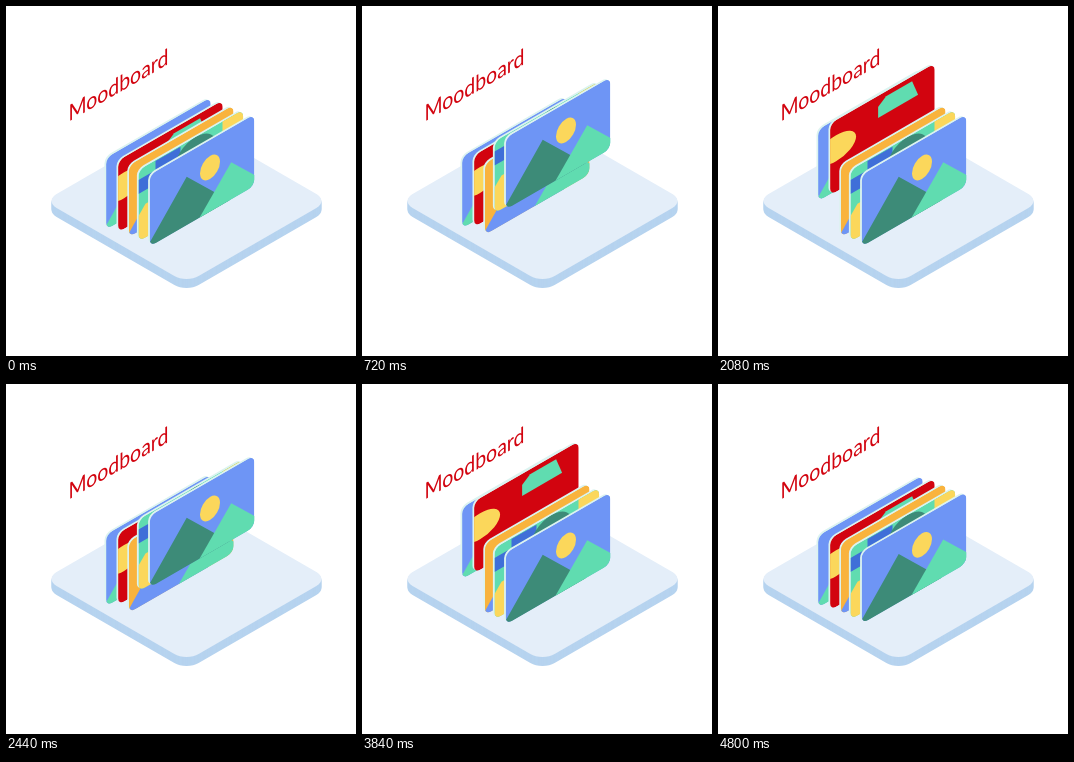
An HTML page with a canvas that plays this animation: 350 px wide and 350 px high, repeating every 4.84 s.

```html
<!DOCTYPE html>
<html lang="en">
<head>
<meta charset="utf-8">
<title>Moodboard</title>
<style>
html, body { margin: 0; width: 100%; height: 100%; overflow: hidden; background: #fff; }
canvas { display: block; width: 350px; height: 350px; }
</style>
</head>
<body>
<canvas id="stage"></canvas>
<script>
const canvas = document.getElementById('stage');
const ctx = canvas.getContext('2d');
const scale = window.devicePixelRatio || 1;
canvas.width = canvas.height = 350 * scale;

const LOOP = 4840, STEP = 40;
const WAVES = [120, 1840, 3600];
const STAGGER = 120, RISE = 120, FALL = 680, LIFT = 37;
const SHEAR = -0.577;
const CARD = { w: 104.6, h: 71.7, r: 6.5 };
const C = {
  blue: '#6e95f5', deep: '#3f6fd8', yellow: '#fbd75b', dark: '#3d8b78', green: '#60dcb0',
  red: '#d2040f', orange: '#f9b33d', rim: '#dcf3f0',
  top: '#e4eef9', side: '#b6d3ef', text: '#d2040f'
};

function place(a, b, c, d, x, y) {
  ctx.setTransform(a * scale, b * scale, c * scale, d * scale, x * scale, y * scale);
}

function poly(color, ...points) {
  ctx.beginPath();
  points.forEach(([x, y]) => ctx.lineTo(x, y));
  ctx.fillStyle = color;
  ctx.fill();
}

function oval(color, x, y, rx, ry) {
  ctx.beginPath();
  ctx.ellipse(x, y, rx, ry, 0, 0, Math.PI * 2);
  ctx.fillStyle = color;
  ctx.fill();
}

function rect(color, x, y, w, h) {
  ctx.fillStyle = color;
  ctx.fillRect(x, y, w, h);
}

function landscape(sky, near, far, sun) {
  return (x, y) => {
    rect(sky, 0, 0, CARD.w, CARD.h);
    oval(sun, 60.3, 27.6, 10, 11.5);
    place(1, 0, 0, 1, x, y);
    poly(near, [37, 2], [110, 42.5], [110, 90], [-12.4, 90]);
    poly(far, [81.5, -12.5], [110, 3], [110, 90], [23, 90]);
  };
}

function collage() {
  rect(C.red, 0, 0, CARD.w, CARD.h);
  oval(C.yellow, 6, 28, 20, 13);
  poly(C.green, [48, 11], [56, 5], [82, 5], [88, 22], [48, 22]);
}

function abstract() {
  rect(C.green, 0, 0, CARD.w, CARD.h);
  rect(C.deep, 17, 1, 25, 10);
  rect(C.deep, 0, 10, 42, 14);
  oval(C.dark, 57, 22, 22, 22);
  rect(C.yellow, 84, 0, 22, CARD.h);
  poly(C.yellow, [0, 46], [7, 38], [76, 38], [76, 80], [0, 80]);
}

const cards = [
  { x: 100.1, y: 151.7, paint: landscape(C.blue, C.green, C.dark, C.yellow) },
  { x: 112.1, y: 154.6, paint: collage },
  { x: 122.9, y: 159.3, paint: landscape(C.orange, C.blue, C.green, C.yellow) },
  { x: 132.5, y: 163.9, paint: abstract },
  { x: 143.7, y: 168.7, paint: landscape(C.blue, C.dark, C.green, C.yellow) }
];

// Fraction of the lift while falling: one drop, then three shrinking bounces.
function dropHeight(u) {
  if (u < 1 / 2.75) return 1 - 7.5625 * u * u;
  const bounces = [[1.5, 0.25], [2.25, 0.0625], [2.625, 0.015625]];
  const [mid, peak] = bounces[u < 2 / 2.75 ? 0 : u < 2.5 / 2.75 ? 1 : 2];
  return 0.57 * Math.max(0, peak - 7.5625 * (u - mid / 2.75) ** 2);
}

function lift(t) {
  if (t <= 0 || t >= RISE + FALL) return 0;
  if (t < RISE) return LIFT * Math.sin(t / RISE * Math.PI / 2);
  return LIFT * dropHeight((t - RISE) / FALL);
}

function cardPath(x, y) {
  place(1, SHEAR, 0, 1, x, y);
  ctx.beginPath();
  ctx.roundRect(0, 0, CARD.w, CARD.h, CARD.r);
}

function drawCard(paint, x, y) {
  ctx.fillStyle = C.rim;
  cardPath(x - 1.6, y - 0.9);
  ctx.fill();
  ctx.save();
  cardPath(x, y);
  ctx.clip();
  paint(x, y);
  ctx.restore();
}

function drawPlatform() {
  for (let depth = 9; depth >= 0; depth--) {
    place(0.866, 0.5, -0.866, 0.5, 180.5, 195 + depth);
    ctx.beginPath();
    ctx.roundRect(-82, -82, 164, 164, 14);
    ctx.fillStyle = depth ? C.side : C.top;
    ctx.fill();
  }
}

function drawTitle() {
  place(0.866, -0.5, 0, 1, 62.4, 115.8);
  ctx.font = '22.5px Lato, sans-serif';
  ctx.fillStyle = C.text;
  ctx.fillText('Moodboard', 0, 0);
}

function draw(now) {
  const t = Math.floor(now % LOOP / STEP) * STEP;
  const start = WAVES.findLast(w => w <= t) ?? LOOP;
  place(1, 0, 0, 1, 0, 0);
  rect('#fff', 0, 0, 350, 350);
  drawPlatform();
  drawTitle();
  cards.forEach(({ x, y, paint }, i) => {
    drawCard(paint, x, y - lift(t - start - i * STAGGER));
  });
}

const origin = performance.now();
function tick() {
  draw(performance.now() - origin);
  requestAnimationFrame(tick);
}
tick();
</script>
</body>
</html>
```
